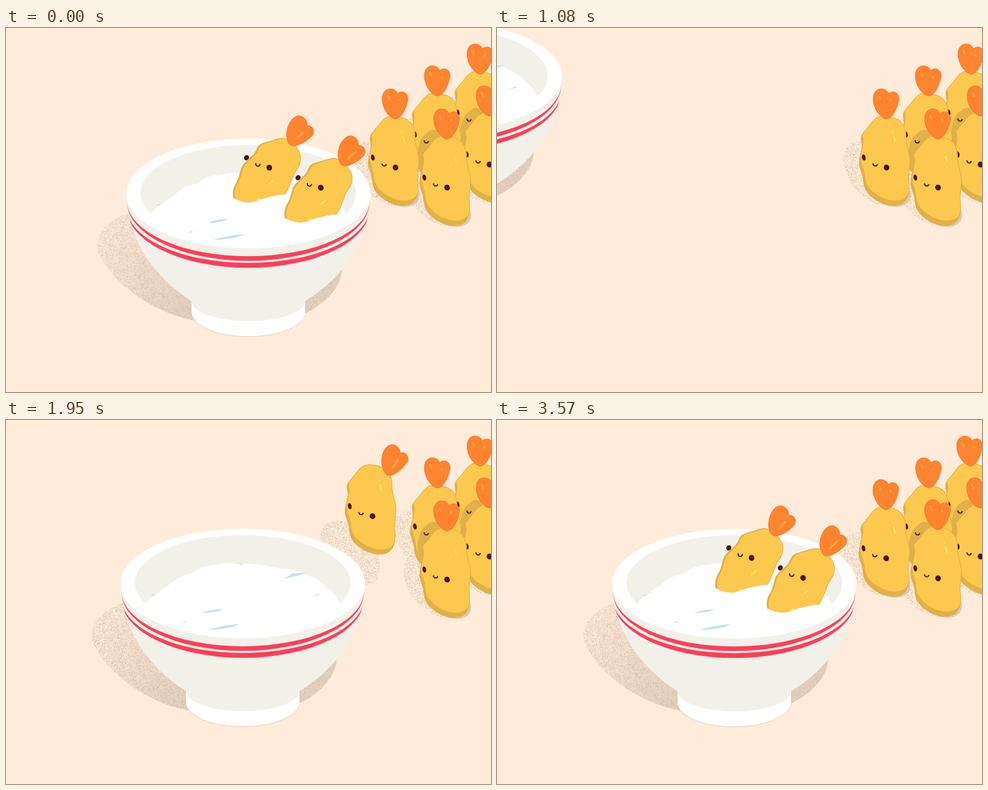
These frames come from a looping animation (800 px wide and 600 px high, 3600 ms). An HTML page with a canvas:

```html
<!DOCTYPE html>
<html lang="en">
<head>
<meta charset="utf-8">
<title>Tempura bowl</title>
<style>
html, body { margin: 0; height: 100%; overflow: hidden; background: #feebd9; }
canvas { display: block; }
</style>
</head>
<body>
<canvas id="stage" width="800" height="600"></canvas>
<script>
const LOOP = 3600, TAU = Math.PI * 2;
const ctx = document.getElementById('stage').getContext('2d');
const clamp = v => Math.max(0, Math.min(1, v));
const rad = deg => deg * Math.PI / 180;

// Stippled texture for the shadows
function makeGrain() {
  const tile = document.createElement('canvas');
  tile.width = tile.height = 200;
  const g = tile.getContext('2d');
  let seed = 7;
  const random = () => (seed = (seed * 16807) % 2147483647) / 2147483647;
  g.fillStyle = 'rgba(200,178,157,.55)';
  for (let i = 0; i < 13000; i++) g.fillRect(random() * 200 | 0, random() * 200 | 0, 1, 1);
  return ctx.createPattern(tile, 'repeat');
}
const grain = makeGrain();

function smoothPath(points) {
  const path = new Path2D(), n = points.length;
  const mid = i => {
    const a = points[i % n], b = points[(i + 1) % n];
    return [(a[0] + b[0]) / 2, (a[1] + b[1]) / 2];
  };
  path.moveTo(...mid(n - 1));
  for (let i = 0; i < n; i++) path.quadraticCurveTo(...points[i], ...mid(i));
  path.closePath();
  return path;
}

const BODY = smoothPath([[-14, -75], [8, -75], [27, -67], [35, -50], [34, -35], [39, -17], [42, 0],
  [38, 25], [41, 48], [34, 68], [15, 74], [-6, 69], [-25, 57], [-35, 42], [-36, 24], [-44, 4],
  [-40, -14], [-37, -27], [-41, -42], [-28, -56]]);
const HEART = new Path2D('M0 0C-12-2-24-22-21-38C-18-54 0-52 4-42C13-49 22-42 21-32C18-16 10 0 0 0Z');
const WATERLINE = new Path2D('M-150-400H150V10L60 18Q45 30 28 25Q8 28-10 34Q-20 39-30 38Q-40 37-50 32L-73 24L-150 8Z');
const BOWL = new Path2D('M189 270C192 345 232 405 297 447A93.5 33 0 0 0 484 447C550 407 590 345 592 270Z');
const BASE = new Path2D('M297 440V465A93.5 40 0 0 0 484 465V440Z');
const RICE = new Path2D('M205 315L231 303Q234 293 247 289Q254 280 268 273Q285 256 307 253Q325 238 345 239Q362 233 390 237Q430 238 450 245Q480 245 502 258Q520 264 531 278Q545 287 550 301L580 320V380H205Z');
const BOWL_SHADOW = new Path2D('M200 299C150 315 132 345 146 372C168 418 240 476 330 483L484 467C520 450 547 420 545 390Z');
const RIPPLES = new Path2D('M323 318Q340 311 358 312Q345 318 323 318M332 346Q360 338 385 336Q370 345 332 346M289 334L300 331L296 334M376 236L391 237V239M459 262L472 253L497 251L480 257M503 290L518 286L514 289M238 289L245 286L243 290');

function ellipse(x, y, rx, ry, color, angle = 0) {
  ctx.fillStyle = color;
  ctx.beginPath();
  ctx.ellipse(x, y, rx, ry, angle, 0, TAU);
  ctx.fill();
}

function fill(path, color) {
  ctx.fillStyle = color;
  ctx.fill(path);
}

function line(x1, y1, x2, y2, width, color) {
  ctx.lineWidth = width;
  ctx.lineCap = 'round';
  ctx.strokeStyle = color;
  ctx.beginPath();
  ctx.moveTo(x1, y1);
  ctx.lineTo(x2, y2);
  ctx.stroke();
}

function drawTempura({ x, y, lean = 0, tail = 0, slide = 0, dunk = 0, shaded = false }) {
  ctx.save();
  ctx.translate(x, y);
  ctx.save();
  ctx.rotate(rad(lean));

  ctx.save();
  ctx.clip(BODY);
  fill(BODY, '#dfb148');
  ctx.translate(2.5, -8 + 7 * dunk);
  fill(BODY, '#fdc84e');
  if (shaded) {
    ellipse(-16, 30, 17, 32, '#dfb148', .12);
    ellipse(-8, 4, 12, 10, '#dfb148', -.4);
  }
  ctx.restore();
  ctx.lineWidth = 1;
  ctx.strokeStyle = '#e0ac40';
  ctx.stroke(BODY);
  if (dunk < .5) {
    line(15, -41, 17, -33, 2.4, '#fbea55');
    line(13, -49, 13.2, -48, 1.6, '#fbea55');
  }

  ctx.translate(2 + 31 * slide, -70 + 15 * slide);
  ctx.rotate(rad(tail - lean));
  fill(HEART, '#fe8430');
  ctx.lineWidth = .8;
  ctx.strokeStyle = '#ec7228';
  ctx.stroke(HEART);
  if (dunk > .8 || slide > .5) {
    line(3, -15, 6, -30, 3.4, '#ffa63a');
  } else {
    line(-12, -38, -10, -33, 4, '#ffa035');
    line(7, -31, 7.5, -30.5, 4, '#ffa035');
  }
  ctx.restore();

  if (dunk > .5) {
    line(7, 8, 14, 2, 2.4, '#fbea55');
    line(-13, 34, -9, 32, 2, '#fbea55');
  }
  // The face stays level while the body leans
  ctx.translate(-16.5 + 4.5 * dunk, 5 - 29 * dunk);
  ellipse(-18.5, -11.5, 3 + dunk, 5 - .5 * dunk, '#4b1519', -.2 + .8 * dunk);
  ellipse(19, 5, 4.6, 4.9, '#4b1519', -.4);
  ctx.lineWidth = 1.9;
  ctx.strokeStyle = '#4b1519';
  ctx.beginPath();
  ctx.arc(.3, -1, 3.5, .1, Math.PI + .25);
  ctx.stroke();
  ctx.restore();
}

function drawGroundShadow({ x, y, lift }) {
  ellipse(x - 20 - .19 * lift, y + lift + 20 - .33 * lift, 62, 38, grain, rad(50));
  if (lift < 8) ellipse(x + 4, y + 45, 41, 26, 'rgba(200,178,157,.6)', rad(28));
}

function drawBowlShadow() {
  const shade = ctx.createLinearGradient(150, 340, 310, 440);
  shade.addColorStop(0, 'rgba(205,184,163,.05)');
  shade.addColorStop(1, 'rgba(205,184,163,.5)');
  fill(BOWL_SHADOW, shade);
  fill(BOWL_SHADOW, grain);
}

function drawStripe(top, bottom) {
  ctx.fillStyle = '#fc3f58';
  ctx.beginPath();
  ctx.ellipse(390.5, top - 91, 200, 91, 0, 0, Math.PI);
  ctx.ellipse(390.5, bottom - 97, 200, 97, 0, Math.PI, 0, true);
  ctx.fill();
}

function drawBowl() {
  ctx.save();
  ctx.translate(0, 1);
  fill(BASE, '#e3cfbb');
  ctx.restore();
  fill(BASE, '#fff');
  fill(BOWL, '#f2f1e9');
  ctx.save();
  ctx.clip(BOWL);
  drawStripe(373, 380.5);
  drawStripe(384, 392);
  ctx.restore();
  ellipse(390.5, 269.5, 201.5, 90.5, '#fff');
  ellipse(390.5, 268.5, 178, 79, '#f2f1e9');
  ctx.save();
  ctx.beginPath();
  ctx.ellipse(390.5, 268.5, 179, 80, 0, 0, TAU);
  ctx.clip();
  fill(RICE, '#fff');
  ctx.restore();
  fill(RIPPLES, '#c0e1f6');
}

function bowlOffset(t) {
  if (t < 700 || t > 3563) {
    const d = 633 * Math.pow(((t + 37) % LOOP) / 637, 1.5);
    return [d, d * .352];
  }
  const r = Math.pow(Math.max(0, 1650 - t) / 360, 2);
  return [-194 * r, -76 * r];
}

// Big leap from the queue into the bowl
function leap(x, y, start, t) {
  const q = clamp((t - start) / 666), s = q + .3 * q * (1 - q);
  const arc = Math.sin(Math.PI * q), after = Math.max(0, t - start - 666);
  const lift = 165 * 4 * q * (1 - q);
  const bob = q < 1 ? 0 : 14 * Math.exp(-after / 60) * Math.sin(after / 60);
  const swing = q < 1 ? 0 : -26 * Math.exp(-after / 220) * Math.sin(after / 90);
  return {
    x: x - 228 * s, y: y + 26 * s - lift + bob, lift, q,
    lean: 34 * q ** 3, dunk: q ** 3,
    tail: 100 * Math.pow(Math.max(0, arc), 1.5) + 34 * q ** 8 + swing,
    slide: Math.min(1, 1.7 * (1 - q) * Math.pow(Math.max(0, arc), .7))
  };
}

// Small hop one place forward in the queue
function hop(x, y, start, t) {
  const s = clamp((t - start) / 540), after = Math.max(0, t - start - 540);
  const lift = 52 * 4 * s * (1 - s);
  const sway = s < 1 ? Math.min(1, s * 4) : Math.exp(-after / 110) * Math.cos(after / 90);
  return { x: x - 70 * s, y: y + 36 * s - lift, lift, lean: 9 * sway, tail: 19 * sway };
}

function inBowl(item, x, y, offset) {
  ctx.save();
  if (item.q > .7) {
    ctx.translate(x + offset[0], y + offset[1]);
    ctx.clip(WATERLINE);
    ctx.translate(-x, -y);
  }
  drawTempura(item);
  ctx.restore();
}

function drawScene(t) {
  ctx.fillStyle = '#feebd9';
  ctx.fillRect(0, 0, 800, 600);
  const step = Math.floor(t / 90);
  grain.setTransform(new DOMMatrix([1, 0, 0, 1, step * 67 % 200, step * 41 % 200]));

  const queue = [
    { ...hop(850, 110, 2785, t), shaded: t > 3325 },
    { ...hop(780, 146, 2616, t), shaded: t < 2413 || t > 3156 },
    hop(865, 179, 2700, t),
    { ...hop(709.5, 182, 2440, t), shaded: t < 2144 },
    hop(795, 215, 2413, t)
  ];
  const leapers = [leap(640, 220, 1863, t), leap(725, 253, 2144, t)];
  const offset = bowlOffset(t), leaving = t < 700;

  for (const item of [...queue, ...leapers]) if (!(item.q >= 1)) drawGroundShadow(item);
  ctx.save();
  ctx.translate(...offset);
  drawBowlShadow();
  ctx.restore();

  queue.forEach(drawTempura);
  if (t < 1500) leapers.forEach(drawTempura);

  ctx.save();
  ctx.translate(...offset);
  drawBowl();
  if (leaving) {
    const push = 6 * clamp((t + 37) / 37);
    for (const [x, y] of [[412, 246], [497, 279]]) {
      inBowl({ x: x + push, y, q: 1, lean: 34, tail: 36, dunk: 1 }, x + push, y, [0, 0]);
    }
  }
  ctx.restore();

  if (t >= 1500) {
    inBowl(leapers[0], 412, 246, offset);
    inBowl(leapers[1], 497, 279, offset);
  }
}

function frame() {
  drawScene(performance.now() % LOOP);
  requestAnimationFrame(frame);
}
frame();
</script>
</body>
</html>
```
